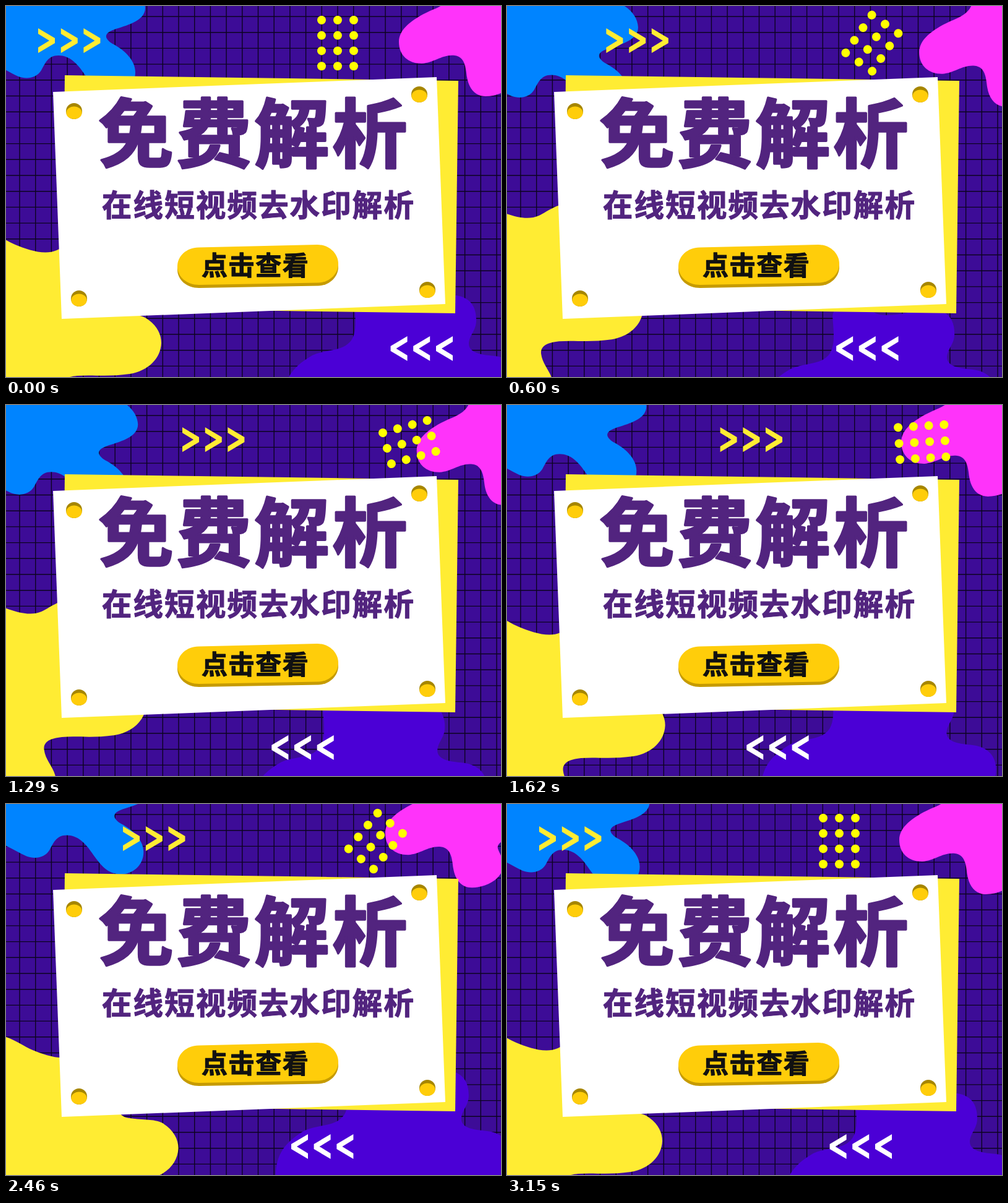
Recreate the animation shown at these times as an HTML page. Size 800 px wide and 600 px high, loop 3180 ms.

```html
<!DOCTYPE html>
<html lang="zh-CN">
<head>
<meta charset="utf-8">
<title>免费解析</title>
<style>
  html, body { margin: 0; width: 100%; height: 100%; overflow: hidden; background: #3d0c97; }
  svg { display: block; width: 800px; height: 600px; }
  text {
    font-family: "Noto Sans CJK SC", "Noto Sans CJK", "Noto Sans CJK JP", sans-serif;
    font-weight: 900;
    stroke-linejoin: round;
  }
  .purple { fill: #52247f; stroke: #52247f; }
  .black { fill: #111; stroke: #111; }
</style>
</head>
<body>
<svg viewBox="0 0 800 600" xmlns="http://www.w3.org/2000/svg">
  <defs>
    <path id="chevron" d="M0,0 L27,16 V24 L0,40 V31 L18,20 L0,9 Z"/>
    <g id="chevrons">
      <use href="#chevron"/>
      <use href="#chevron" x="36.8"/>
      <use href="#chevron" x="73.4"/>
    </g>
    <g id="pin">
      <circle r="13" fill="#a68600"/>
      <ellipse cy="2.8" rx="12.6" ry="10.2" fill="#ffcd0a"/>
    </g>
    <path id="pill" d="M311,390.5 L503,386 C522,386 537,400 537,417 C537,434 522,447 505,447.5 L312,451 C292,451 277,438 277,421 C277,404 292,391 311,390.5 Z"/>
  </defs>

  <rect width="800" height="600" fill="#3d0c97"/>
  <path id="grid" fill="none" stroke="#0c0320" stroke-width="1.4"/>

  <path id="blue" fill="#0084ff" d="M-80,-120 L118,-120 C120,-90 124,-62 131,-52 C138,-38 148,-37 161,-38 C195,-46 224,-22 225,3 C225,25 192,32 175,38 C158,44 158,52 172,61 C195,73 209,90 209,107 C209,130 190,143 173,143 C150,143 140,128 128,112 C115,92 102,80 85,80 C67,80 63,94 57,104 C49,117 33,119 20,114 C5,107 -10,97 -30,90 L-80,80 Z"/>
  <path id="pink" fill="#ff33fa" d="M725,-120 L722,-30 C721,-8 705,0 685,8 C655,22 635,38 635,58 C635,80 650,93 672,93 C692,92 705,78 725,80 C742,82 743,100 745,115 C748,133 758,146 775,146 C803,146 827,128 826,108 C825,95 815,85 817,79 C819,72 828,68 840,66 L920,60 V-120 Z"/>
  <path id="yellow" fill="#ffec33" d="M-120,340 L-60,358 C-20,362 -5,378 15,386 C35,394 62,404 82,395 C100,386 115,373 140,374 C190,383 190,430 165,460 C150,480 153,493 170,496 C195,500 210,497 225,504 C243,515 251,530 251,545 C250,570 230,590 200,595 C165,600 140,596 115,598 C95,600 85,606 86,618 C88,635 100,645 104,660 C108,690 95,710 80,740 L-120,740 Z"/>
  <path id="indigo" fill="#4b00d6" d="M448,760 V640 C448,605 462,584 495,565 C515,556 540,558 553,546 C570,533 564,500 563,480 C564,465 578,461 595,460 C620,460 625,478 648,478 C685,478 705,466 728,468 C752,472 760,488 760,508 C760,525 750,530 748,545 C747,562 770,564 790,566 C815,569 828,585 828,605 C828,640 800,660 790,700 L780,760 Z"/>

  <g id="dots" fill="#ff0"></g>
  <use id="right" href="#chevrons" fill="#ffec33"/>
  <use id="left" href="#chevrons" fill="#fff"/>

  <path fill="#ffec33" d="M95,112 L731,121 L726,497 L91,488 Z"/>
  <path fill="#fff" d="M76,139 L696,115 L710,482 L90,506 Z"/>
  <use href="#pin" x="110" y="170"/>
  <use href="#pin" x="668" y="143"/>
  <use href="#pin" x="681" y="459"/>
  <use href="#pin" x="118" y="473"/>

  <text class="purple" x="149.5" y="250.5" font-size="121" letter-spacing="5" stroke-width="3.5">免费解析</text>
  <text class="purple" x="155" y="340" font-size="48.5" letter-spacing="2.1" stroke-width="1.2">在线短视频去水印解析</text>
  <use href="#pill" y="5" fill="#c69b00"/>
  <use href="#pill" fill="#ffcd0a"/>
  <text class="black" x="316" y="435" font-size="42" letter-spacing="1.6" stroke-width="1.2">点击查看</text>
</svg>
<script>
  const LOOP = 3180, STEP = 30, END = 3150;
  const $ = id => document.getElementById(id);

  // background grid
  const PITCH = 25.7;
  let lines = "";
  for (let x = 22; x < 800; x += PITCH) lines += `M${x},0V600`;
  for (let y = 17; y < 600; y += PITCH) lines += `M0,${y}H800`;
  $("grid").setAttribute("d", lines);

  for (let row = 0; row < 4; row++) {
    for (let col = 0; col < 3; col++) {
      const dot = document.createElementNS("http://www.w3.org/2000/svg", "circle");
      dot.setAttribute("cx", (col - 1) * 26);
      dot.setAttribute("cy", (row - 1.5) * 24.8);
      dot.setAttribute("r", 7);
      $("dots").append(dot);
    }
  }

  // each key: [time, x, y, angle]
  const tracks = {
    blue: [[0, 0, 0], [1010, -22, 53], [2090, 17.5, -42], [END, 5.5, -6]],
    pink: [[0, 0, 0], [1000, 52, 28], [2070, -34, -17], [END, -1, 0]],
    yellow: [[0, 0, 0], [990, -51, -92], [2060, 43.5, 18.5], [END, 0, 0]],
    indigo: [[0, 0, 0], [1010, -62, 37], [2090, -18.7, -57], [END, 0, 0]],
    dots: [[0, 536, 60, 0], [1560, 676, 60, 90], [END, 537, 60, 0]],
    right: [[0, 52, 36], [1650, 350, 36], [END, 52, 36]],
    left: [[0, 722, 534], [1590, 485, 534], [END, 622, 534]]
  };

  function pose(keys, t) {
    let i = 1;
    while (i < keys.length - 1 && t > keys[i][0]) i++;
    const a = keys[i - 1], b = keys[i];
    const k = Math.min(1, (t - a[0]) / (b[0] - a[0]));
    return a.map((v, n) => v + (b[n] - v) * k);
  }

  function draw(t) {
    for (const id in tracks) {
      const [, x, y, angle = 0] = pose(tracks[id], t);
      const turn = id === "left" ? "scale(-1 1)" : `rotate(${angle})`;
      $(id).setAttribute("transform", `translate(${x} ${y}) ${turn}`);
    }
  }

  const start = performance.now();
  function tick() {
    const t = (performance.now() - start) % LOOP;
    draw(Math.floor(t / STEP) * STEP);
    requestAnimationFrame(tick);
  }
  tick();
</script>
</body>
</html>
```
